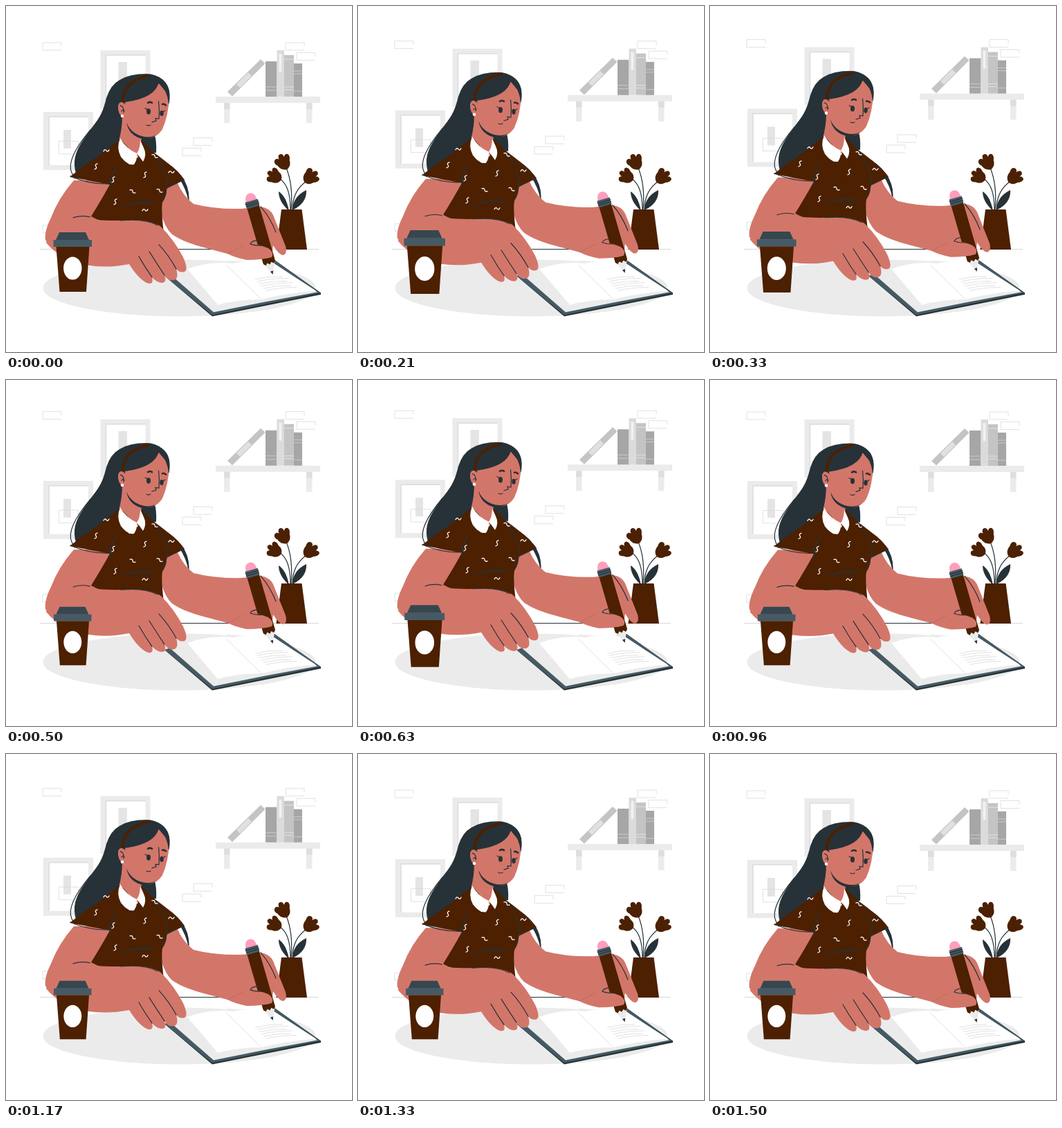
An HTML page that plays this animation: 500x500 px, repeating every 1.54 s.

```html
<!DOCTYPE html>
<html lang="en">
<head>
<meta charset="utf-8">
<title>Writing at a desk</title>
<style>
  html, body { margin: 0; height: 100%; overflow: hidden; background: #fff; }
  svg { display: block; width: 100vw; height: 100vh; }
  .skin { fill: #d3766a; }
  .dark { fill: #263238; }
  .brown { fill: #4c2000; }
  .slate { fill: #455a64; }
  .pale { fill: #ebebeb; }
  .white { fill: #fff; }
  .line { fill: none; stroke: #263238; stroke-width: 1.2; stroke-linecap: round; }
  .thin { fill: none; stroke: #dadada; stroke-width: .8; }
</style>
</head>
<body>
<svg viewBox="0 0 500 500">
  <defs>
    <g id="frame">
      <path class="pale" d="M0 0h72v84H0z"/>
      <path class="white" d="M8 7h57v70H8z"/>
      <path d="M8 77V7h57" fill="none" stroke="#dcdcdc" stroke-width="1.5"/>
    </g>
    <g id="bloom" class="brown">
      <path d="M0 1Q-9-1-10-10Q-14-16-10-19Q-6-21-4-17Q-3-24 1-23Q5-22 4-17Q8-21 11-18Q13-14 9-9Q8-1 0 1z"/>
      <path d="M-4-17L-2-11M4-17L2-11" fill="none" stroke="#263238" stroke-width=".6"/>
    </g>
  </defs>

  <g id="wall">
    <use href="#frame" x="136.5" y="64"/>
    <use href="#frame" x="54" y="153"/>
    <path d="M162.500 81H175v40h-12.500zM83 179h11v27H83z" fill="#e4e4e4"/>
    <g id="bricks"></g>
    <path class="pale" d="M303 131h151v9H303zM315 140h8.500v29h-8.500zM434 140h8.500v29H434z"/>
    <path fill="#dedede" d="M315 140h8.500v9h-8.500zM434 140h8.500v9H434z"/>
    <path fill="#c4c4c4" d="M320 124L368 77L374.500 83L327 130.500z"/>
    <path fill="#e0e0e0" d="M333 113L350 96L355 101L338 118z"/>
    <path fill="#a6a6a6" d="M375 80h16.500v51H375zM416 83h12v48h-12z"/>
    <path fill="#dbdbdb" d="M391.500 64H402v67h-10.500z"/>
    <path fill="#c4c4c4" d="M402 71h14v60h-14z"/>
    <path stroke="#c9c9c9" d="M375 117h16.500M375 122h16.500M416 94h12M416 98h12M416 123h12"/>
    <path stroke="#e2e2e2" d="M402 77h14M402 117h14M402 121h14"/>
    <path fill="#f1f1f1" d="M394.500 69h4v26h-4z"/>
  </g>

  <path d="M49 351.500H452" stroke="#d8d8d8"/>
  <path d="M228 351.500H326" stroke="#263238"/>
  <ellipse class="pale" cx="250.500" cy="407.500" rx="197" ry="41"/>

  <path class="line" d="M411 294Q411 260 396 250M412 294Q415 258 405 234M414 294Q414 268 433 254"/>
  <path class="dark" d="M409 296Q394 283 394 268Q405 275 409 296zM414 295Q414 276 434 266Q435 285 414 295z"/>
  <use href="#bloom" transform="translate(397 251) rotate(-60) scale(.95)"/>
  <use href="#bloom" transform="translate(406 235) rotate(-28)"/>
  <use href="#bloom" transform="translate(432 254) rotate(50)"/>
  <path class="brown" d="M398 294h29.500L435 352h-44.500z"/>

  <path class="dark" d="M229 390L298 448.500L455 417V414.500L388 367L300 441z"/>
  <path class="slate" d="M229 390L240 386L388 367L454 414.500L298 446.500z"/>
  <path class="pale" d="M237 387.500L262 377L322 368L386 371L450 413.500L372 428L300 442.500z"/>
  <path class="white" d="M262 380Q295 368 328 372Q362 365 386 371.500L448 411.500Q410 414 369 424Q335 424 306 432z"/>
  <path class="thin" d="M318 374L369 424"/>
  <path id="script" class="thin"/>

  <g id="woman">
    <path class="line" d="M122 179Q86 222 95 241L99 249"/>
    <path class="dark" d="M232 226Q269 250 264 287Q262 258 232 226z"/>
    <path class="dark" d="M203 98Q178 98 164 107Q151 114 145 133C139 158 133 164 121 180C107 199 98 213 99 230Q100 243 104 249L165 215L217 212Q218 194 214 184L236 140Q239 114 225 106Q216 98 203 98z"/>
    <path class="skin" d="M168 158Q168 178 163 195L178 224L192 216L196 191Q216 194 226 178Q235 158 236 130L221 112L171 137z"/>
    <path class="dark" d="M174 168Q180 184 198 188.500Q209 191 217 186Q208 194 195 191.500Q177 186 174 168z"/>
    <path class="dark" d="M167 141Q166 107 203 100Q229 98 236 123Q237 134 235 141Q233 122 221 110Q216 133 172 139L173 149z"/>
    <path d="M168.500 139Q169 108 208 100.500" fill="none" stroke="#4c2000" stroke-width="4"/>
    <path class="skin" d="M174 144Q165 134 162 144Q161 157 171 163z"/>
    <path class="line" d="M165 144Q171 145 170 154M167 152Q169 149 171 152"/>
    <circle class="white" cx="168" cy="159" r="2.200"/>
    <path class="line" d="M220.500 138Q222 150 221 163L216 162.500L217 166L211 168M203 172Q206 174 209 172"/>
    <path class="line" style="stroke-width:2.600" d="M205 140Q208 138 211 140M226 142Q228 141 231 143.500"/>
    <g class="dark">
      <ellipse cx="206" cy="152.500" rx="3" ry="4.200"/>
      <ellipse cx="225" cy="155" rx="2.700" ry="4"/>
    </g>
    <path class="line" d="M201 148L205 150M227 153L230 151"/>

    <path class="skin" d="M226 262L247 254Q256 275 271 286Q302 294 340 293L368 290Q381 292 386 302L404 347Q407 359 400 360Q394 359 386 346L384 363Q369 367 348 367Q332 364 320 358C290 350 258 343 240 330Q230 321 224 300z"/>
    <path class="skin" d="M98 252Q76 277 65 306Q55 326 57 338Q63 348 82 355L124 330L156 252z"/>
    <path class="brown" d="M165 192Q150 204 132 218Q112 231 92 247L150 258Q138 280 123 304Q150 320 228 328Q224 295 226 284Q233 273 232 264L258 251Q246 235 214 212L196 194L190 220z"/>
    <path class="line" d="M93 246Q120 258 148 257L159 232M154 240Q152 252 149 265M216 215Q233 237 233 259Q231 274 225 281M232 262Q244 258 257 251M169 290Q188 283 213 286M182 285Q200 281 211 284"/>
    <path class="white" d="M165 191Q159 205 166 218Q176 231 185 229Q190 222 189 213Q194 219 198 225Q204 215 199 205L194 194Q194 206 189 213Q173 206 165 191z"/>
    <path id="squiggles" fill="none" stroke="#fff" stroke-width="1.300" stroke-linecap="round"/>

    <path class="skin" d="M62 323Q80 306 111 305Q130 311 168 310Q207 307 224 319Q243 338 256 363Q264 381 258 384Q251 386 246 380Q250 394 243 396Q235 398 229 389Q233 400 225 400Q217 399 211 392Q214 402 206 401Q193 397 178 373Q148 379 120 375Q78 367 58 342z"/>
    <path class="line" d="M97 306Q110 302 121 305M166 310Q202 307 219 317M221 345Q235 360 246 380M207 355Q217 371 229 389M192 362Q201 378 211 392"/>

    <g transform="translate(385.500 388) rotate(-16.200)">
      <path class="pale" d="M-8.500-18H8.500L0 0z"/>
      <path class="dark" d="M-2.200-5H2.200L0 0z"/>
      <path class="brown" d="M-9-102H9V-18L6-15L3-18L0-15L-3-18L-6-15L-9-18z"/>
      <path d="M-8-108V-113Q-7-122 0-122Q7-122 8-113V-108z" fill="#ff9dbd"/>
      <path class="slate" d="M-9.500-111H9.500V-101H-9.500z"/>
      <path class="line" d="M-9.500-107.500H9.500M-9.500-104.500H9.500"/>
    </g>
    <path class="skin" d="M334 350L353 344Q365 344 379 350Q388 356 384 363Q370 367 348 366z"/>
    <path class="line" d="M364 339Q355 339 353 344Q361 347 370 346M368 290Q382 306 390 327"/>
    <path d="M320 358L344 346" stroke="#b9655c" stroke-width=".7"/>
  </g>

  <g id="cup">
    <path fill="#37474f" d="M77 327h38l5 11H72z"/>
    <path class="slate" d="M68.500 338h55.500v10H68.500z"/>
    <path class="brown" d="M72.500 348h48L116 413H77.500z"/>
    <ellipse class="white" cx="96.300" cy="379" rx="13.200" ry="16.500"/>
  </g>
</svg>
<script>
const LOOP = 1540, PEAK = 717;
const $ = id => document.getElementById(id);

// x, y, width, height
$('bricks').innerHTML = [
  [53, 53, 27, 11], [404, 53, 27, 11], [420, 67.5, 27, 11], [271, 190.5, 27, 11],
  [255, 205.5, 27, 11], [53, 317, 27, 11], [76.5, 195.5, 28, 18.5]
].map(([x, y, w, h]) =>
  `<path class="thin" d="M${x + w} ${y + h / 2}v${-h / 2}h${-w}v${h}h${w}"/>`).join('');

// x, y, direction
$('squiggles').setAttribute('d', [
  [145, 209, 0], [177, 226, 1], [130, 232, 2], [201, 244, 2], [155, 251, 2], [183, 268, 1],
  [222, 267, 1], [215, 217, 1], [239, 240, 0], [158, 283, 2], [201, 295, 0]
].map(([x, y, turn]) => `M${x} ${y}` + [
  'm-4 1q2-4 4-1t4-1', 'm-4-2q4-1 4 2t4 2', 'm-2 4q4-1 2-4t2-4'
][turn]).join(''));

$('script').setAttribute('d', Array.from({ length: 6 }, (_, i) =>
  `M${360 + i * 3} ${395 + i * 3.3}q20-5 ${40 + i % 2 * 5}-${4 + i % 2}`).join(''));

// Cup scale as [time, scale], eased between keys
const beats = [[0, 1], [210, 1.07], [440, .98], [500, .98], [710, 1.07], [950, .98], [LOOP, .98]];

function cupScale(t) {
  const i = beats.findIndex(key => key[0] > t);
  const [t0, s0] = beats[i - 1], [t1, s1] = beats[i];
  return s0 + (s1 - s0) * (1 - Math.cos(Math.PI * (t - t0) / (t1 - t0))) / 2;
}

function draw(now) {
  const t = now % LOOP;
  const lift = (1 + Math.cos(2 * Math.PI * (t - PEAK) / LOOP)) / 2;
  $('wall').setAttribute('transform', `translate(0 ${-9 * lift})`);
  $('woman').setAttribute('transform', `translate(0 ${-8.5 * lift})`);
  $('cup').setAttribute('transform', `translate(96.3 370) scale(${cupScale(t)}) translate(-96.3 -370)`);
}

const start = performance.now();
function tick() {
  draw(performance.now() - start);
  requestAnimationFrame(tick);
}
tick();
</script>
</body>
</html>
```
